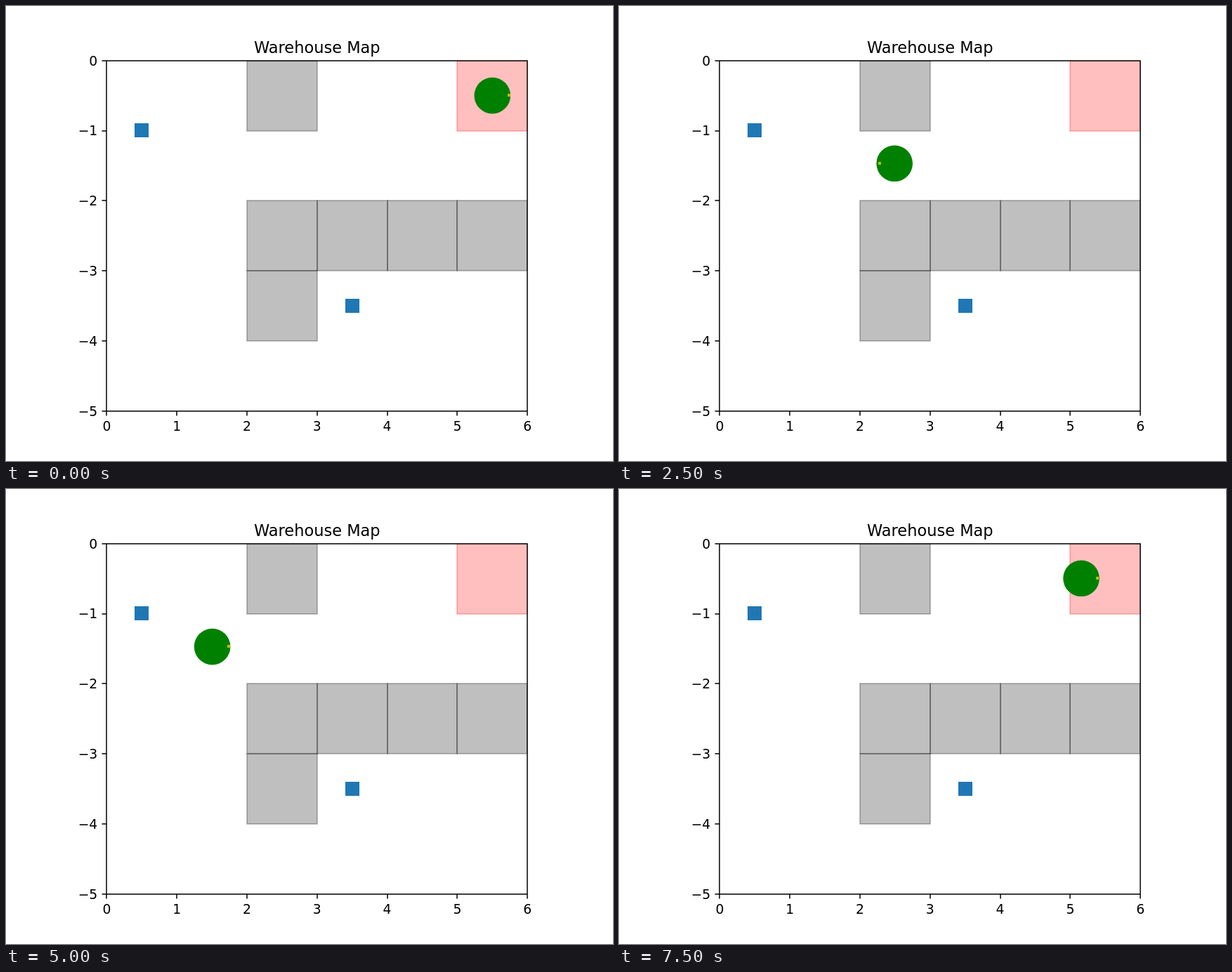
Write an HTML page that moves like this. It is 864x648 px and loops after 8000 ms.

```html
<!DOCTYPE html>
<html lang="en">
<head>
<meta charset="utf-8">
<title>Warehouse Map</title>
<style>
  html, body { margin: 0; width: 100%; height: 100%; overflow: hidden; background: #fff; }
  svg { display: block; width: 864px; height: 648px; }
  text { font: 18.75px "DejaVu Sans", sans-serif; }
  .title { font-size: 22.5px; }
  .cell { fill-opacity: .25; stroke-opacity: .25; stroke-width: 1.875; }
  .axes { fill: none; stroke: #000; stroke-width: 1.5; }
</style>
</head>
<body>
<svg id="stage" viewBox="0 0 864 648">
  <clipPath id="plot"><rect x="143" y="78" width="599" height="499"/></clipPath>
  <g id="cells" clip-path="url(#plot)"></g>
  <g fill="#1f77b4" shape-rendering="crispEdges">
    <rect x="183" y="167" width="20" height="20"/>
    <rect x="483" y="417" width="20" height="20"/>
  </g>
  <g id="axes"></g>
  <circle id="robot" r="25.8" fill="#008000"/>
  <rect id="nose" width="4" height="4" fill="#bfbf00"/>
</svg>
<script>
const STEP = 500;
const UNIT = 99.792;
const byId = id => document.getElementById(id);
const px = x => 143.42 + x * UNIT;
const py = y => 77.76 + y * UNIT;
const snapX = x => Math.round(px(x));
const snapY = y => 648 - Math.round(648 - py(y));

function add(parent, tag, attrs, text) {
  const el = document.createElementNS("http://www.w3.org/2000/svg", tag);
  for (const key in attrs) el.setAttribute(key, attrs[key]);
  if (text !== undefined) el.textContent = text;
  parent.appendChild(el);
}

function cell(col, row, color) {
  const x = snapX(col), y = snapY(row);
  add(byId("cells"), "rect", {
    class: "cell", x, y, fill: color, stroke: color,
    width: snapX(col + 1) - x, height: snapY(row + 1) - y
  });
}

function drawMap() {
  for (const [col, row] of [[2, 0], [2, 2], [3, 2], [4, 2], [5, 2], [2, 3]]) cell(col, row, "#000");
  cell(5, 0, "#f00");

  const axes = byId("axes");
  let ticks = "M143 78H742V577H143Z";
  for (let i = 0; i <= 6; i++) {
    ticks += `M${snapX(i)} 577v6.5`;
    add(axes, "text", { x: px(i), y: 604.6, "text-anchor": "middle" }, i);
  }
  for (let i = 0; i <= 5; i++) {
    ticks += `M143 ${snapY(i)}h-6.5`;
    add(axes, "text", { x: 130.3, y: py(i) + 6.9, "text-anchor": "end" }, i ? "\u2212" + i : "0");
  }
  add(axes, "path", { class: "axes", d: ticks });
  add(axes, "text", { class: "title", x: 442.8, y: 66.6, "text-anchor": "middle" }, "Warehouse Map");
}

// Nose offset from the robot centre for each heading
const nose = { R: [23.3, -0.4], L: [-21, -0.8], D: [0.8, 21.3], U: [0.8, -23] };

// One pose per step: centre x, centre y, heading
const poses = [
  [692.3, 127.6, "R"], [692.3, 127.6, "D"], [592.3, 127.6, "L"], [493, 127.6, "L"],
  [491.3, 226, "D"], [392.2, 224.3, "L"], [292.2, 222.9, "L"], [193.2, 221.6, "L"],
  [193.2, 221.6, "L"], [193.2, 221.6, "D"], [293.6, 224.6, "R"], [393, 226.8, "R"],
  [492.2, 228.8, "R"], [590.4, 227.2, "R"], [591.8, 127.9, "U"], [658, 127.3, "R"]
];

function render(t) {
  const [x, y, heading] = poses[Math.floor(t / STEP) % poses.length];
  const [dx, dy] = nose[heading];
  const robot = byId("robot"), mark = byId("nose");
  robot.setAttribute("cx", x);
  robot.setAttribute("cy", y);
  mark.setAttribute("x", Math.round(x + dx - 2));
  mark.setAttribute("y", Math.round(y + dy - 2));
}

drawMap();
render(0);
let start;
function tick(now) {
  start ??= now;
  render(now - start);
  requestAnimationFrame(tick);
}
requestAnimationFrame(tick);
</script>
</body>
</html>
```
